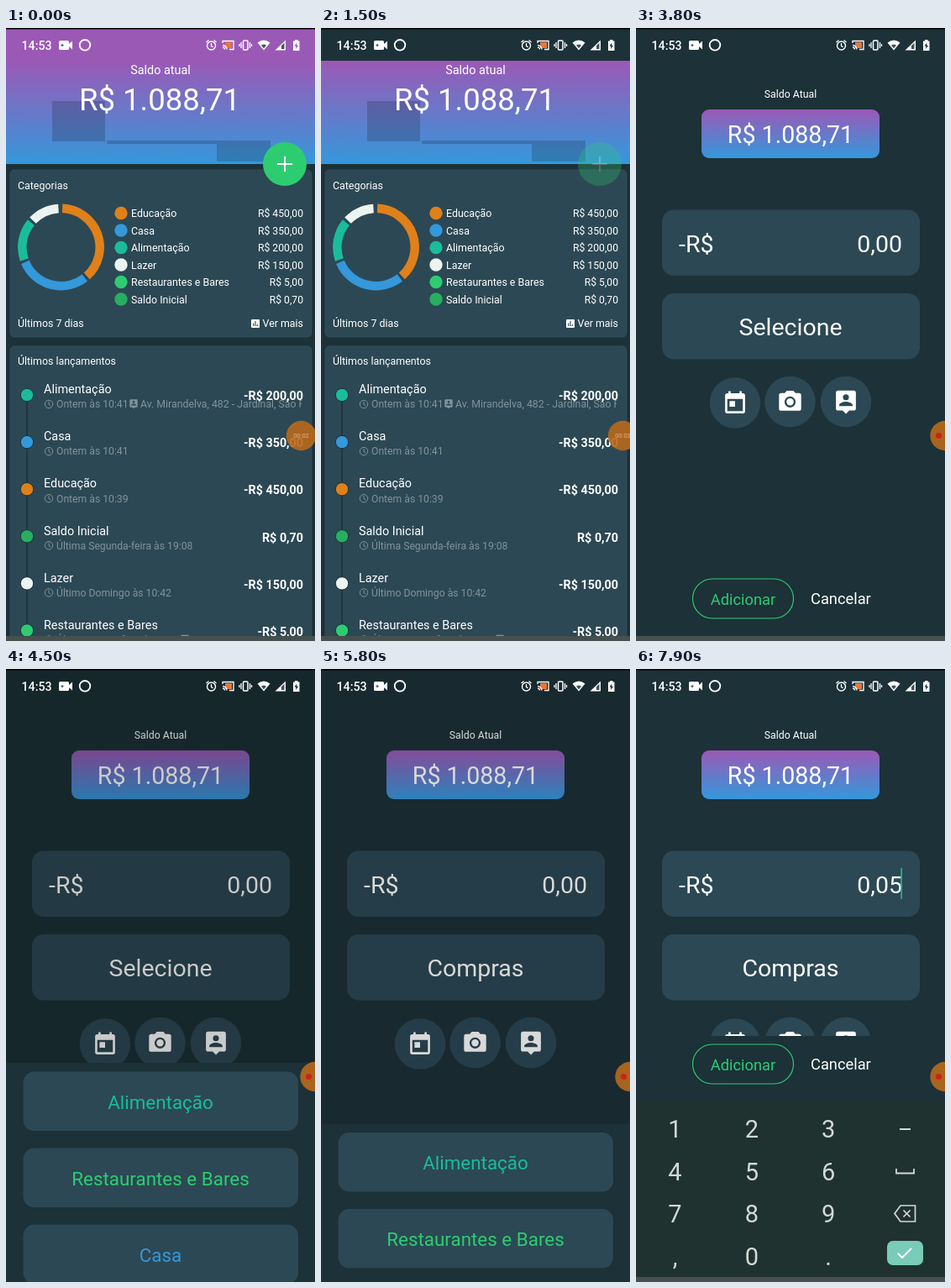
Animation, 368 px wide and 730 px high, one loop 8000 ms. Source, as an HTML page:

```html
<!DOCTYPE html>
<html lang="pt-BR">
<head>
<meta charset="utf-8">
<title>Finanças</title>
<style>
  html, body { margin: 0; width: 100%; height: 100%; overflow: hidden; background: #1c3138; }
  svg { display: block; width: 100%; height: 100%; }
  text { font-family: Roboto, sans-serif; white-space: pre; }
</style>
</head>
<body>
<svg id="stage" viewBox="0 0 368 730"></svg>
<script>
const LOOP = 8000;
const BG = '#1c3138', CARD = '#2c4854', WHITE = '#fff', MUTED = '#80949b';
const GREEN = '#2ecc71', PURPLE = '#9b59b6', BLUE = '#3498db', TEAL = '#1abc9c', ORANGE = '#e08019', SNOW = '#ecf4f1';

const rect = (x, y, w, h, fill, r = 0, extra = '') =>
  `<rect x="${x}" y="${y}" width="${w}" height="${h}" rx="${r}" fill="${fill}" ${extra}/>`;
const circle = (x, y, r, fill, extra = '') => `<circle cx="${x}" cy="${y}" r="${r}" fill="${fill}" ${extra}/>`;
const text = (s, x, y, size, { fill = WHITE, anchor = 'start', weight = 400, id = '' } = {}) =>
  `<text ${id && `id="${id}"`} x="${x}" y="${y}" font-size="${size}" fill="${fill}" text-anchor="${anchor}" font-weight="${weight}">${s}</text>`;
const line = (d, stroke = WHITE, width = 1.5, extra = '') =>
  `<path d="${d}" fill="none" stroke="${stroke}" stroke-width="${width}" ${extra}/>`;
const shape = (d, fill = WHITE) => `<path d="${d}" fill="${fill}" fill-rule="evenodd"/>`;
const group = (id, body, extra = '') => `<g id="${id}" ${extra}>${body}</g>`;
const place = (x, y, scale, body) => `<g transform="translate(${x} ${y}) scale(${scale})">${body}</g>`;
const pill = (x, y, w, label, tx, ty) =>
  rect(x, y, w, 47, 'none', 23.5, `stroke="${GREEN}" stroke-width="1.2"`) + text(label, tx, ty, 18.3, { fill: GREEN, anchor: 'middle' });

// Icons on a 24 unit grid, centred on 0,0
const calendar = shape('M7-9H6v-2H4v2H-4v-2H-6v2H-7a2 2 0 0 0-2 2V7a2 2 0 0 0 2 2H7a2 2 0 0 0 2-2V-7a2 2 0 0 0-2-2zM7 7H-7V-4H7zM-5-2H0V3H-5z');
const camera = shape('M-3-10L-4.8-8H-8a2 2 0 0 0-2 2V6a2 2 0 0 0 2 2H8a2 2 0 0 0 2-2V-6a2 2 0 0 0-2-2H4.8L3-10zM0 5A5 5 0 1 1 0-5 5 5 0 0 1 0 5z') + circle(0, 0, 3.2, WHITE);
const pin = fill => shape('M7-10H-7a2 2 0 0 0-2 2V6a2 2 0 0 0 2 2H-3L0 11 3 8H7a2 2 0 0 0 2-2V-8a2 2 0 0 0-2-2zM0-6.7A2.7 2.7 0 1 1 0-1.3 2.7 2.7 0 0 1 0-6.7zM6 4H-6V3.1C-6 1.1-2 0 0 0S6 1.1 6 3.1z', fill);
const clock = (x, y) => circle(x, y, 4.7, 'none', `stroke="${MUTED}"`) + line(`M${x} ${y - 3}v3.3l2.3 1.4`, MUTED, 1);

const categories = [
  ['Educação', 450, ORANGE], ['Casa', 350, BLUE], ['Alimentação', 200, TEAL],
  ['Lazer', 150, SNOW], ['Restaurantes e Bares', 5, GREEN], ['Saldo Inicial', 0.7, '#27ae60']
];
const colorOf = name => categories.find(c => c[0] === name)[2];
const money = v => 'R$ ' + v.toFixed(2).replace('.', ',');

function donut(cx, cy, r) {
  const total = categories.reduce((sum, c) => sum + c[1], 0), pad = 0.034;
  const point = a => `${cx + r * Math.sin(a)} ${cy - r * Math.cos(a)}`;
  let angle = 0;
  return categories.map(([, value, color]) => {
    const from = angle + pad, to = (angle += value / total * 2 * Math.PI) - pad;
    return to <= from ? '' : line(`M${point(from)}A${r} ${r} 0 ${+(to - from > Math.PI)} 1 ${point(to)}`, color, 10.5);
  }).join('');
}

const entries = [
  ['Alimentação', 'Ontem às 10:41', '-R$ 200,00'],
  ['Casa', 'Ontem às 10:41', '-R$ 350,00'],
  ['Educação', 'Ontem às 10:39', '-R$ 450,00'],
  ['Saldo Inicial', 'Última Segunda-feira às 19:08', 'R$ 0,70'],
  ['Lazer', 'Último Domingo às 10:42', '-R$ 150,00'],
  ['Restaurantes e Bares', 'Última Quinta-feira às 20:10', '-R$ 5,00']
];

function home() {
  const border = 'stroke="#36525d" stroke-width=".8"';
  const legend = categories.map(([name, value, color], i) => {
    const y = 220.5 + i * 20.5;
    return circle(137, y, 7.7, color) + text(name, 149, y + 4.7, 12.4) + text(money(value), 354, y + 4.7, 12.2, { anchor: 'end' });
  }).join('');
  const rows = entries.map(([name, when, amount], i) => {
    const y = 437 + i * 56.1;
    const address = i ? '' : place(152, y + 10.5, 0.52, pin(MUTED)) +
      `<g clip-path="url(#rowClip)">${text('Av. Mirandelva, 482 - Jardinal, São Rui', 160, y + 15.3, 12.3, { fill: MUTED })}</g>`;
    return circle(25, y, 7.7, colorOf(name), `stroke="${BG}"`) + text(name, 45, y - 1.8, 14.4) +
      clock(51, y + 11) + text(when, 60, y + 15.3, 12.2, { fill: MUTED }) + address +
      (i === 5 ? place(213, y + 10.5, 0.52, pin(MUTED)) : '') +
      text(amount, 354, y + 6.2, 14.3, { anchor: 'end', weight: 700 });
  }).join('');
  return rect(0, 39, 368, 691, BG) + rect(0, 39, 368, 123, 'url(#sky)') +
    group('bars', rect(55, 87, 63, 48) + rect(120, 134, 131, 4) + rect(251, 134, 64, 25), 'opacity=".17"') +
    text('Saldo atual', 184, 54.5, 14.4, { anchor: 'middle' }) +
    text('R$ 1.088,71', 183, 98, 36.5, { anchor: 'middle' }) +
    rect(5, 169, 359, 199, CARD, 5, border) + text('Categorias', 14, 191.5, 12.4) +
    donut(65.5, 261, 46.2) + legend + text('Últimos 7 dias', 14, 356, 12.4) +
    rect(292, 347, 10, 10, WHITE, 1) + line('M294.7 355v-3.5M297 355v-6M299.3 355v-2', CARD, 1.1) +
    text('Ver mais', 354, 356, 12.4, { anchor: 'end' }) +
    rect(5, 379, 359, 360, CARD, 5, border) + text('Últimos lançamentos', 14, 401, 12.4) +
    line('M25 437V724', BG, 1.5) + rows +
    group('fab', circle(332, 162, 26, GREEN) + line('M323 162h18M332 153v18', WHITE, 2));
}

function form() {
  const buttons = [[118, 446.5, 447, calendar], [183.5, 445, 445.3, camera], [250, 445, 445, pin(WHITE)]]
    .map(([x, y, iconY, icon]) => circle(x, y, 30.3, CARD) + place(x, iconY, 1.32, icon)).join('');
  return rect(0, 39, 368, 691, BG) + text('Saldo Atual', 184, 83, 12.3, { anchor: 'middle' }) +
    rect(78, 97, 212, 58, 'url(#tag)', 9) + text('R$ 1.088,71', 184, 137, 28.6, { anchor: 'middle' }) +
    rect(31, 216.5, 307, 78.5, CARD, 14) + text('-R$', 51, 267, 28.5) +
    text('0,00', 317, 266.5, 28.5, { anchor: 'end', id: 'amount' }) +
    rect(315.3, 237, 1.6, 37, TEAL, 0, 'id="caret"') +
    rect(31, 316, 307, 78.5, CARD, 14) + text('Selecione', 184, 366, 28.5, { anchor: 'middle', id: 'category' }) + buttons +
    group('footer', rect(0, 646, 368, 84, BG) + pill(67.5, 656, 120, 'Adicionar', 127.5, 687) + text('Cancelar', 208, 686, 18.3));
}

function keyboard() {
  const ink = '#d3d9d6';
  const keys = ['123', '456', '789', ',0.'].map((row, r) => [...row].map((key, c) =>
    text(key, 46.5 + c * 91.3, 558 + r * 50.5, 29, { fill: ink, anchor: 'middle' })).join('')).join('');
  return rect(0, 515, 368, 215, '#20322f') + keys +
    line('M314 548h13', ink, 2) + line('M310 595v5.5h21V595', ink, 1.8) +
    line('M315 639h17.5v19H315L308 648.500zM318.500 644.500l8 8m0-8l-8 8', ink, 1.7) +
    rect(299, 681, 43, 29, '#7acbb8', 7) + line('M312 696l5 5 11-11', WHITE, 2);
}

function sheet() {
  const items = [
    ['Alimentação', TEAL], ['Restaurantes e Bares', GREEN], ['Casa', BLUE], ['Compras', PURPLE],
    ['Cuidados Pessoais', '#f1c40f'], ['Dívidas e Empréstimos', '#f39c12'], ['Educação', ORANGE]
  ].map(([name, color], i) => rect(20.5, 49.5 + i * 91, 327.5, 70.5, CARD, 13) +
    text(name, 184, 94 + i * 91, 22.4, { fill: color, anchor: 'middle' })).join('');
  return rect(0, 39, 368, 691, BG) + `<g clip-path="url(#listClip)">${items}</g>` +
    pill(135, 667, 98, 'Fechar', 184, 697) + rect(0, 724, 368, 6, '#46504f');
}

function statusIcons() {
  return text('14:53', 18.5, 25.5, 14.2, { weight: 500 }) +
    rect(63, 15, 12, 11, WHITE, 1.5) + shape('M75 19l4-3.500v10l-4-3.500z') + circle(67, 20.5, 1.5, '#596a75') +
    circle(94, 20.3, 6.3, 'none', 'stroke="#fff" stroke-width="1.8"') +
    circle(244.5, 21, 5, 'none', 'stroke="#fff" stroke-width="1.4"') + line('M244.500 18v3.300l2 1.500M238.500 17l3-2.500M250.500 17l-3-2.500', WHITE, 1.3) +
    rect(261, 17, 8, 7, '#e8753a') + line('M258 18v-2.500h13v10h-5M258 20.500a5 5 0 0 1 5 5M258 23a2.500 2.500 0 0 1 2.500 2.500', WHITE, 1.3) +
    rect(282.5, 15, 5.500, 11, 'none', 1, 'stroke="#fff" stroke-width="1.5"') + line('M280 17v7M290.500 17v7M278 19v3M292.500 19v3', WHITE, 1.3) +
    shape('M299.500 17.500Q307 11.500 314.500 17.500L307 26.500z') + shape('M304 20.700Q307 18.500 310 20.700L307 24.300z', '#40545c') +
    shape('M320.500 26.500L333 14.500V26.500z') + shape('M328 21L331.500 17.800V25H328z', '#40545c') +
    shape('M342 15.500h2v-1.500h3.500v1.500h2V27h-7.500zM346.300 17.500l-2.800 4h1.800v3.500l2.800-4.300h-1.800z');
}

const gradient = (id, from, to) => `<linearGradient id="${id}" x2="0" y2="1"><stop stop-color="${from}"/><stop offset="1" stop-color="${to}"/></linearGradient>`;
const clip = (id, ...box) => `<clipPath id="${id}">${rect(...box, '#000')}</clipPath>`;

document.getElementById('stage').innerHTML =
  `<defs>${gradient('sky', PURPLE, BLUE)}${gradient('tag', PURPLE, BLUE)}${clip('rowClip', 150, 430, 202, 40)}${clip('listClip', 0, 39, 368, 617)}</defs>` +
  group('home', home()) + rect(0, 0, 368, 39, BG, 0, 'id="statusBar"') + group('form', form()) + group('keyboard', keyboard()) +
  rect(0, 724, 368, 6, '#46504f') + rect(0, 0, 368, 730, '#000', 0, 'id="dim"') + group('sheet', sheet()) +
  rect(0, 0, 368, 1.5, '#000') + statusIcons() +
  group('bubble', circle(0, 485.5, 17.7, '#b96a1c', 'opacity=".9"') +
    text('', 0, 488, 7.5, { id: 'timer', fill: '#e0b08c', anchor: 'middle' }) + circle(-7.5, 485.5, 3.6, '#cc2318', 'id="recDot"'));

const el = Object.fromEntries([...document.querySelectorAll('[id]')].map(e => [e.id, e]));
const ease = (t, from, to) => { const p = Math.min(1, Math.max(0, (t - from) / (to - from))); return p * p * (3 - 2 * p); };
const shiftY = (e, y) => e.setAttribute('transform', `translate(0 ${y})`);
const show = (e, on) => e.setAttribute('visibility', on ? 'visible' : 'hidden');

function render(t) {
  const formIn = ease(t, 1520, 1800);
  el.fab.setAttribute('opacity', 1 - 0.72 * ease(t, 1340, 1490));
  el.statusBar.setAttribute('fill', t < 1450 ? PURPLE : BG);
  el.form.setAttribute('opacity', formIn);
  shiftY(el.form, 40 * (1 - formIn));

  const open = ease(t, 4430, 4600) - ease(t, 5650, 5880);
  show(el.sheet, open > 0);
  shiftY(el.sheet, 691 * (1 - open));
  el.dim.setAttribute('opacity', Math.min(0.35, open * 0.55));
  el.category.textContent = t < 5700 ? 'Selecione' : 'Compras';

  const typing = ease(t, 7230, 7430);
  show(el.keyboard, typing > 0);
  shiftY(el.keyboard, 215 * (1 - typing));
  shiftY(el.footer, -209 * typing);
  el.amount.textContent = t < 7780 ? '0,00' : '0,05';
  show(el.caret, t >= 7250 && (t < 7500 || t >= 7780));

  const docked = t >= 3200;
  const x = 351.5 + 8 * ease(t, 500, 700) + 8.5 * ease(t, 3050, 3250);
  el.bubble.setAttribute('transform', `translate(${x} 0)`);
  el.timer.textContent = '00:0' + (Math.floor(t / 1000) + 2);
  show(el.timer, !docked);
  show(el.recDot, docked);
}

function tick(now) {
  render(now % LOOP);
  requestAnimationFrame(tick);
}
render(0);
requestAnimationFrame(tick);
</script>
</body>
</html>
```
